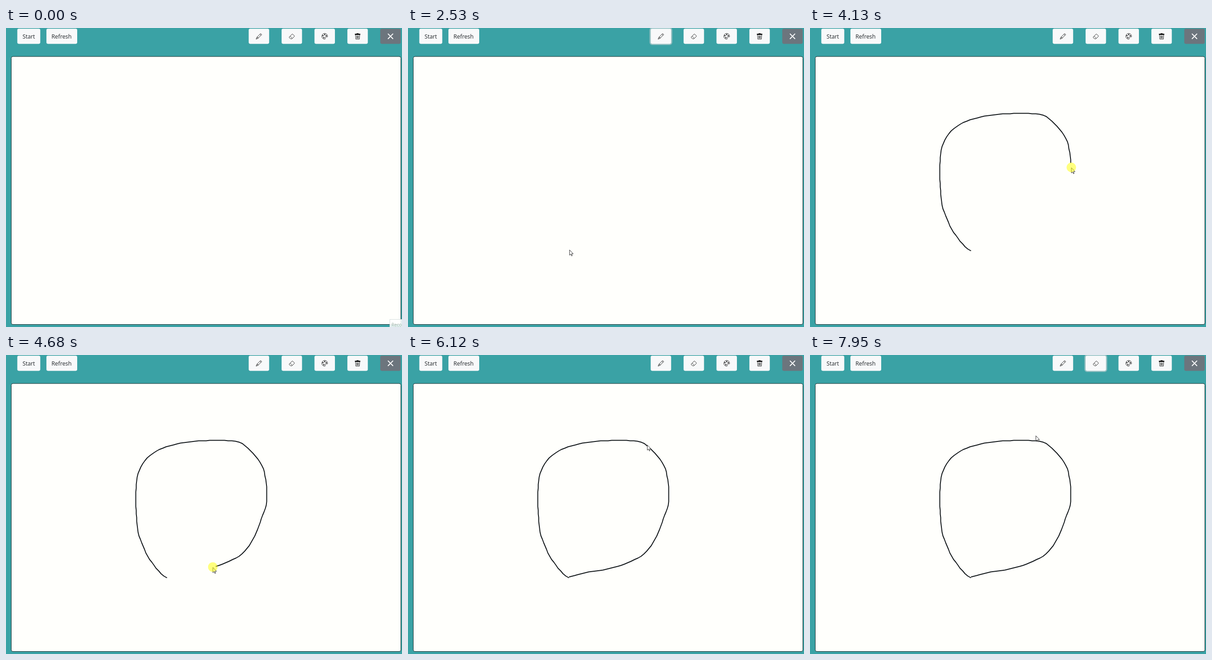
An HTML page for the animation above (8000 ms loop, 862x650 px).

```html
<!DOCTYPE html>
<html lang="en">
<head>
<meta charset="utf-8">
<title>Whiteboard</title>
<style>
  html, body { margin: 0; width: 100%; height: 100%; overflow: hidden; background: #3aa2a5; }
  svg { display: block; }
  text { font-family: "Open Sans", "Noto Sans", sans-serif; fill: #212529; }
  .button { fill: #f8f9fa; }
  .icon { fill: none; stroke: #000; stroke-width: 1; }
  .icon .solid { fill: #000; stroke: none; }
  .ring { fill: none; stroke: #d3d4d5; stroke-opacity: .55; stroke-width: 3; }
  .pointer { fill: #fff; stroke: #1a1a1a; stroke-width: .9; stroke-linejoin: round; }
</style>
</head>
<body>
<svg width="862" height="650" viewBox="0 0 862 650">
  <rect width="862" height="650" fill="#3aa2a5"/>
  <rect x="11.5" y="62" width="848" height="582.5" rx="3.5" fill="#fffffc" stroke="#14292a"/>

  <g id="toolbar" transform="translate(.3 .4)">
    <rect class="button" x="24.3" y="1" width="50" height="33" rx="3.3"/>
    <text x="35.6" y="22.6" font-size="12.3">Start</text>
    <rect class="button" x="87.7" y="1" width="67" height="33" rx="3.3"/>
    <text x="98.7" y="22.6" font-size="12.3">Refresh</text>
    <g id="tools"></g>
  </g>

  <polyline id="ink" transform="translate(.5 .5)" fill="none" stroke="#13181b" stroke-width="2" stroke-linejoin="round"/>

  <g id="hint">
    <rect x="835.5" y="633.5" width="40" height="30" fill="#fff" fill-opacity=".88" stroke="#d5dedb"/>
    <text x="839" y="649" font-size="10" style="fill:#a3b8ac">Reco</text>
  </g>

  <g id="cursor">
    <path id="arrow" class="pointer" d="M0 0V11.4L2.6 9 4.4 13.1 6 12.4 4.3 8.4H8Z"/>
    <path id="hand" class="pointer" d="M-1.2 9V1.2a1.2 1.2 0 0 1 2.4 0V5.5l4.5.9q1.3.4 1.2 1.9L6.2 12l-.9 3.2H-.8L-2 12.6-4.3 9.2q-.9-1.4.4-1.9 1-.2 2.7 1.7z"/>
    <circle id="glow" cx="-.2" cy="-.8" r="10.4" fill="#ff0" fill-opacity=".5"/>
  </g>
</svg>
<script>
const LOOP = 8000;
const byId = id => document.getElementById(id);

const icons = {
  pencil: '<path d="M12.5.7 15.3 3.5 5.4 13.4.7 15.3 2.6 10.6ZM10.7 2.5l2.8 2.8M2.8 10.5H4.5v1h1v1.7"/>',
  eraser: '<path d="M8.4 2.6a1.5 1.5 0 0 1 2.1 0l3.9 3.9a1.5 1.5 0 0 1 0 2.1l-5.5 5.5a1.5 1.5 0 0 1-1 .4H5.1a1.5 1.5 0 0 1-1-.4l-2.5-2.5a1.5 1.5 0 0 1 0-2.1zM3.8 7.9l5.3 5.3"/>',
  palette: '<path d="M8 .5a7.5 7.5 0 1 0 0 15c1.5 0 1.4-1.1 1.2-2.6-.3-2 .1-3.4 2.4-3.4 2 0 3.9.9 3.9-1.6A7.5 7.5 0 0 0 8 .5z"/>' +
    '<path d="M8 3.5h0M12 6.5h0M3.5 6.5h0M5.5 11.5h0" stroke-width="3" stroke-linecap="round"/>',
  trash: '<path class="solid" d="M5.5 0h5v1.3H15v3H1v-3H5.5z"/><path d="M2.6 4 3.3 15.3h9.4L13.4 4M5.7 6l.3 7.5M8 6v7.5M10.3 6 10 13.5"/>',
  close: '<path d="M1.2 1.2 14.8 14.8M14.8 1.2 1.2 14.8" stroke="#fff" stroke-width="2.3"/>'
};

byId('tools').innerHTML = Object.entries(icons).map(([name, art], i) => `
  <g transform="translate(${528 + 71.6 * i} 1)">
    <rect id="${name}Ring" class="ring" x="-1.2" y="-1.2" width="46.8" height="35.4" rx="4.5" opacity="0"/>
    <rect class="button" width="44.5" height="33" rx="3.3"${name === 'close' ? ' style="fill:#6c757d"' : ''}/>
    <g class="icon" transform="translate(15.6 10) scale(.833)">${art}</g>
  </g>`).join('');

const clamp = v => Math.min(1, Math.max(0, v));
const easeOut = u => 1 - (1 - u) ** 1.85;
const easeInOut = u => u * u * (3 - 2 * u);

// A smooth path through "x,y x,y ..." (Catmull-Rom); returns a lookup by progress 0..1.
function curve(list) {
  const points = list.split(' ').map(p => p.split(',').map(Number));
  const at = i => points[Math.min(points.length - 1, Math.max(0, i))];
  const handle = (i, sign) => at(i).map((v, axis) => v + sign * (at(i + 1)[axis] - at(i - 1)[axis]) / 6);
  const path = document.createElementNS('http://www.w3.org/2000/svg', 'path');
  path.setAttribute('d', points.map((p, i) =>
    i ? `C${handle(i - 1, 1)} ${handle(i, -1)} ${p}` : `M${p}`).join(''));
  const length = path.getTotalLength();
  const pointAt = progress => {
    const { x, y } = path.getPointAtLength(clamp(progress) * length);
    return [x, y];
  };
  return { length, pointAt };
}

const outline = curve('350,484 336,474 309,438 289,391 283,344 283,283 290,249 312,219 351,198.5 411,187 ' +
  '489,186 519,196 552,232 564,265 567,318 556,353 541,393 513,432 470,454 433,465 390,471.5 350,482');

const moves = [
  { from: 260, to: 1300, ease: easeOut, ...curve('804,638 690,330 590,100 546,20') },
  { from: 1640, to: 2530, ease: easeInOut, ...curve('546,20 501,64 395,385 351.7,482.5') },
  { from: 5430, to: 6500, ease: easeInOut, ...curve('351.7,482.5 415,370 575,105 611.7,24.5') },
  { from: 7110, to: 7950, ease: easeInOut, ...curve('611.7,24.5 585,145 545,212 491.7,175.7') }
];

// Steady speed for most of the outline, slowing down over the last part.
function drawn(t) {
  const press = 2607, brake = 4340, stop = 5300, share = .764;
  return t < brake
    ? share * clamp((t - press) / (brake - press))
    : share + (1 - share) * easeOut(clamp((t - brake) / (stop - brake)));
}

const isDrawing = t => t >= 2600 && t < 5430;

function cursorAt(t) {
  if (isDrawing(t)) {
    const [x, y] = outline.pointAt(drawn(t));
    return [x + 1.6, y + .5];
  }
  const move = moves.filter(m => m.from <= t).pop() || moves[0];
  return move.pointAt(move.ease(clamp((t - move.from) / (move.to - move.from))));
}

// Ink trails the pointer and snaps to whole pixels, which gives the stroke its small steps.
function inkPoints(t) {
  const reach = drawn(t - 25) * outline.length;
  const points = [];
  for (let s = 0; s < reach; s += 8)
    points.push(outline.pointAt(s / outline.length).map(Math.round));
  if (reach > 0) points.push(outline.pointAt(reach / outline.length));
  return points.join(' ');
}

// The screen refreshes about every 70 ms and rests for a moment when the outline is closed.
function screenTime(time) {
  const snap = (start, step) => start + Math.floor((time - start) / step) * step;
  if (time < 250) return time;
  return time < 5500 ? Math.min(snap(248, 69.1) + 5, 5300) : snap(5500, 70);
}

const within = (t, from, to) => t >= from && t < to;
const fade = (t, from) => clamp((t - from) / 140);
const show = (id, on) => byId(id).setAttribute('visibility', on ? 'visible' : 'hidden');

function render(time) {
  const t = screenTime(time);
  const overButton = within(t, 1200, 1710) || within(t, 6400, 7180);
  byId('cursor').setAttribute('transform', `translate(${cursorAt(t)})`);
  show('hint', t < 70);
  show('arrow', t >= 250 && !overButton);
  show('hand', overButton);
  show('glow', within(t, 1430, 1570) || isDrawing(t) || within(t, 6970, 7040));
  byId('pencilRing').setAttribute('opacity', fade(t, 1500) - fade(t, 2600));
  byId('eraserRing').setAttribute('opacity', fade(t, 6970));
  byId('ink').setAttribute('points', inkPoints(t));
}

const start = performance.now();
function loop() {
  render((performance.now() - start) % LOOP);
  requestAnimationFrame(loop);
}
loop();
</script>
</body>
</html>
```
